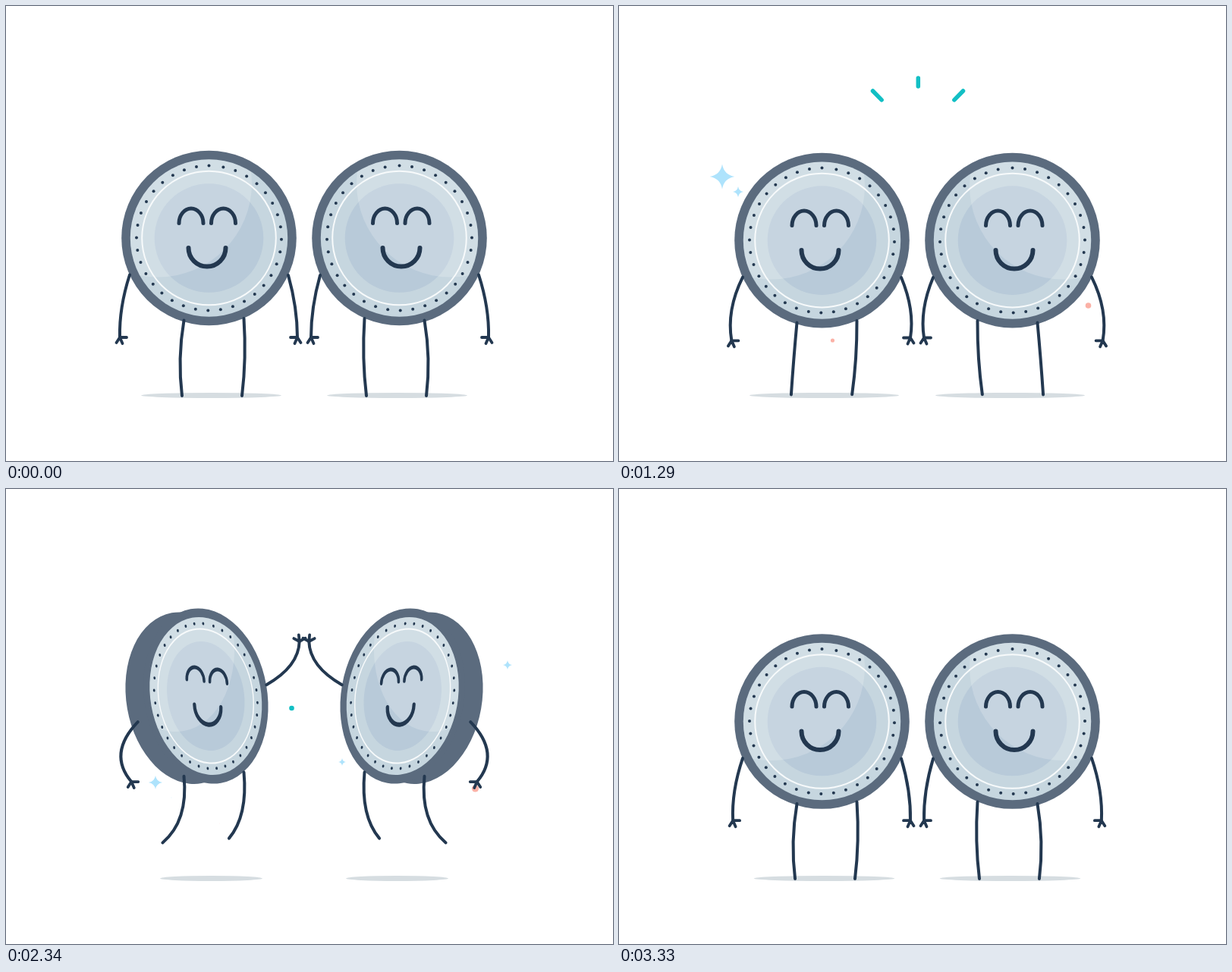
Animation, 800 px wide and 600 px high, one loop 3.36 s. Source, as an HTML page with a canvas:

```html
<!DOCTYPE html>
<html lang="en">
<head>
<meta charset="utf-8">
<title>High five</title>
<style>
html, body { margin: 0; height: 100%; overflow: hidden; background: #fff; }
canvas { display: block; }
</style>
</head>
<body>
<canvas id="stage" width="800" height="600"></canvas>
<script>
const ctx = document.getElementById('stage').getContext('2d');
const JUMP = 1680, MIRROR = 786, TAU = Math.PI * 2;
const INK = '#233850', RIM = '#5b6b7e', TEAL = '#12bfc4', SKY = '#aee3fc', PINK = '#fbb1a6';

const clamp = v => Math.min(1, Math.max(0, v));
const ramp = (t, from, to) => clamp((t - from) / (to - from));
const ease = (t, from, to) => { const u = ramp(t, from, to); return u * u * (3 - 2 * u); };
// Eases up from a to b, holds, and eases down from c to d
const bump = (t, a, b, c, d) => ease(t, a, b) - ease(t, c, d);
const pulse = (t, start, duration = 520) => Math.sin(Math.PI * ramp(t, start, start + duration));

function disc(x, y, r, color, ry = r) {
  ctx.fillStyle = color;
  ctx.beginPath();
  ctx.ellipse(x, y, r, ry, 0, 0, TAU);
  ctx.fill();
}

function line(width, color, draw) {
  ctx.lineWidth = width;
  ctx.strokeStyle = color;
  ctx.beginPath();
  draw();
  ctx.stroke();
}

function limb(x, y, cx, cy, ex, ey) {
  line(4, INK, () => { ctx.moveTo(x, y); ctx.quadraticCurveTo(cx, cy, ex, ey); });
}

function hand(x, y, side, angle) {
  ctx.save();
  ctx.translate(x, y);
  ctx.rotate(angle);
  ctx.scale(side, 1);
  line(3.8, INK, () => {
    for (const [fx, fy] of [[-4.5, 7], [3.5, 8], [9, 0]]) {
      ctx.moveTo(0, 0);
      ctx.lineTo(fx, fy);
    }
  });
  ctx.restore();
}

function coin(cy, turn, wink) {
  const k = 1 - .32 * turn, depth = Math.sqrt(1 - k * k), cx = 267.5 - 6 * depth;
  const place = (x, y, draw) => {
    ctx.save();
    ctx.transform(k, .08 * turn, .04 * turn, 1, x, y);
    draw();
    ctx.restore();
  };
  const eye = (x, y, height) =>
    line(5, INK, () => ctx.ellipse(x, y, 16, height, 0, Math.PI, TAU));

  place(cx - 36 * depth, cy + 3 * turn, () => disc(0, 0, 113, RIM));
  place(cx, cy, () => {
    disc(0, 0, 115.3, RIM);
    disc(0, 0, 103.7, '#c6d6df');
    disc(0, 0, 71.8, '#b8cad9');
    ctx.save();
    ctx.beginPath();
    ctx.arc(0, 0, 103.7, 0, TAU);
    ctx.clip();
    disc(-67, -72, 123.5, 'rgba(255,255,255,.19)');
    ctx.restore();
    line(2, '#f7fafb', () => ctx.arc(0, 0, 88.3, 0, TAU));
    for (let i = 0; i < 36; i++) {
      const a = (11.4 + 9.96 * i) * Math.PI / 180;
      disc(95.5 * Math.sin(a), -95.5 * Math.cos(a), 2, INK);
    }
    ctx.translate(6 * turn, 0);
    eye(-23.5, -19.5 - 5 * wink, 19.5 - 2.5 * turn - 11 * wink);
    eye(19, -19.5, 19.5 - 2.5 * turn);
    line(6, INK, () => ctx.arc(-2.5, 13, 24.5, 0, Math.PI));
  });
}

function buddy(t) {
  const squat = bump(t, 0, 300, 300, 600) + bump(t, 1180, 1460, 1460, JUMP);
  const hop = bump(t, 320, 700, 880, 1340);
  // Feet and knees swing back later than the body
  const [turn, kick, sway] = [1290, 1450, 1600].map(end => bump(t, 300, 750, 900, end));
  const cy = 306 + 12 * squat - 34 * hop, bend = squat * squat;

  disc(270.5, 513.5, 92.5 + 8.5 * squat + 10 * sway - 35 * hop, '#d6dde1', 3.5);
  coin(cy, turn, bump(t, 680, 860, 920, 1150));

  limb(234.5, cy + 108.5 - 3 * turn,
    226 - 22 * bend + 16 * sway, 465 + 8 * squat - 28 * hop,
    232 + 2 * squat - 28.5 * kick, 514 - 49 * hop);
  limb(313.5, cy + 106 - 6 * turn,
    317 + 21 * bend + 16 * turn - 14 * sway, 465 + 5 * squat - 35 * hop,
    311 - 19 * kick, 514 - 55 * hop);

  const outer = [150 + 3 * squat + 30 * turn - 13 * kick, cy + 131 - 8 * squat - 40 * turn + 20 * kick];
  limb(163 + 12 * turn, cy + 48.5 - 16 * turn,
    149 - 16 * squat - 7 * turn - 10 * kick, cy + 92 - 18 * turn, ...outer);
  hand(...outer, 1, 0);

  const inner = [384 + 3 * turn, cy + 131 - 7.5 * squat - 226 * turn];
  limb(372 - 32 * turn, cy + 49 - 71 * turn,
    384 + 17 * squat + 2 * turn, cy + 92 - 146 * turn, ...inner);
  hand(...inner, -1, -3.65 * ramp(turn, .1, .8));
}

function star(x, y, r) {
  const c = .14 * r;
  ctx.fillStyle = SKY;
  ctx.beginPath();
  ctx.moveTo(x, y - r);
  ctx.quadraticCurveTo(x + c, y - c, x + r, y);
  ctx.quadraticCurveTo(x + c, y + c, x, y + r);
  ctx.quadraticCurveTo(x - c, y + c, x - r, y);
  ctx.quadraticCurveTo(x - c, y - c, x, y - r);
  ctx.fill();
}

// A star followed by a small companion
function twinkle(t, x, y, start) {
  star(x, y, 18.3 * pulse(t, start));
  star(x + 21, y + 20, 7 * pulse(t, start + 75));
}

function sparkles(t) {
  for (const start of [70, 955]) twinkle(t, 136, 225, start);
  twinkle(t, 197, 387, 575);
  twinkle(t, 661, 232, 605);
  star(443, 360, 15 * pulse(t, 605));
  for (const start of [150, 890]) disc(281.5, 441, 3.9 * pulse(t, start), PINK);
  for (const start of [400, 1130]) disc(618.5, 395, 4.6 * pulse(t, start), PINK);
  disc(376.5, 289, 4.1 * pulse(t, 505), TEAL);
}

// A stroke whose head runs ahead of its tail
function spark(t, x, y, dx, dy, start) {
  const head = ramp(t, start, start + 385), tail = ramp(t, start + 135, start + 520);
  if (head <= tail) return;
  line(5.5, TEAL, () => {
    ctx.moveTo(x + dx * tail, y + dy * tail);
    ctx.lineTo(x + dx * head, y + dy * head);
  });
}

function render(t) {
  ctx.fillStyle = '#fff';
  ctx.fillRect(0, 0, 800, 600);
  ctx.lineCap = 'round';
  sparkles(t);
  buddy(t);
  ctx.save();
  ctx.translate(MIRROR, 0);
  ctx.scale(-1, 1);
  buddy(t);
  ctx.restore();
  spark(t, 394.3, 156.5, 0, -61.5, 840);
  for (const side of [-1, 1]) spark(t, 394 + 16.5 * side, 156, 43 * side, -44, 875);
}

function frame() {
  render(performance.now() % JUMP);
  requestAnimationFrame(frame);
}
frame();
</script>
</body>
</html>
```
